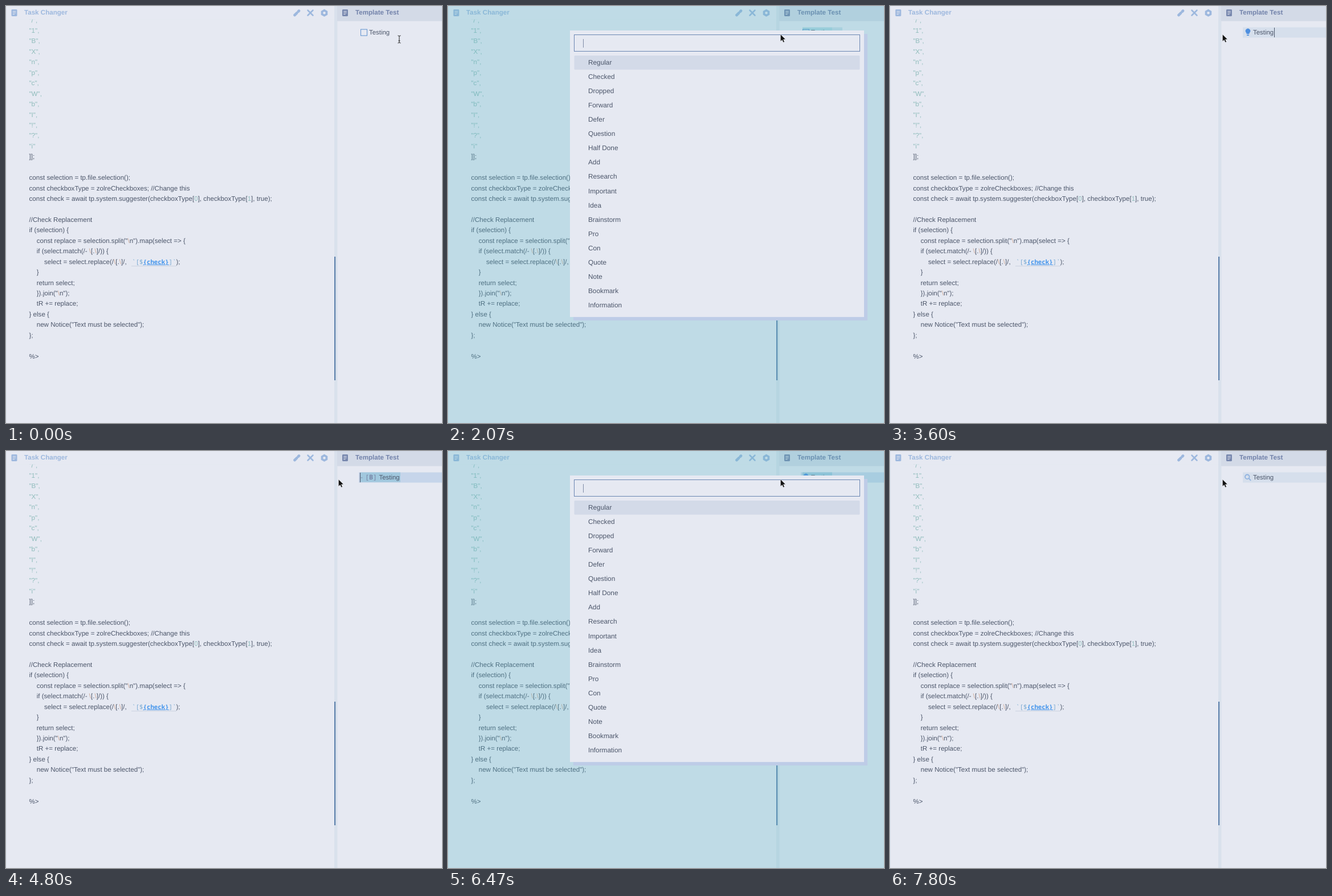
An HTML page for the animation above (8000 ms loop, 765 px wide and 732 px high).

```html
<!DOCTYPE html>
<html lang="en">
<head>
<meta charset="utf-8">
<title>Task Changer</title>
<style>
  html, body { margin: 0; width: 100%; height: 100%; overflow: hidden; background: #e6e9f2; }
  svg { display: block; width: 765px; height: 732px; }
  text { font: 11.6px "Liberation Sans", Arial, sans-serif; fill: #4c566a; white-space: pre; text-rendering: geometricPrecision; }
  .title { font-weight: 700; }
  .str { fill: #8fbcbb; }
  .esc { fill: #cfa793; }
  .mono { font-family: "Noto Sans Mono", "DejaVu Sans Mono", monospace; font-size: 10.8px; fill: #78a9d2; }
  .var { fill: #4596ec; font-weight: 600; text-decoration: underline; }
  .mark { font-family: "Noto Sans Mono", "DejaVu Sans Mono", monospace; fill: #7885a6; }
  .match { font-weight: 700; }
  #typed { font-size: 12px; fill: #7482a6; }
  #dim { fill: rgb(85 181 194 / .27); }
</style>
</head>
<body>
<svg viewBox="0 0 765 732">
  <defs>
    <g id="doc">
      <rect x="0" y="0" width="10" height="12" rx="1.4"/>
      <path d="M2.3 3.4h5.4M2.3 6h5.4M2.3 8.6h3.4" stroke="#e6e9f2" stroke-width="1"/>
    </g>
  </defs>
  <rect width="765" height="732" fill="#e6e9f2"/>
  <g id="code"></g>
  <rect width="576" height="23.5" fill="#e6e9f2"/>
  <rect width="1" height="732" fill="#dce3ee"/>
  <rect x="576" width="5.5" height="732" fill="#d9e1ec"/>
  <rect x="576" y="440" width="2.2" height="217" fill="#5e81ac"/>
  <rect x="581" width="184" height="26.5" fill="#d3dae7"/>

  <g fill="#9db8de">
    <use href="#doc" x="9.5" y="6"/>
    <text class="title" x="32" y="15" style="fill:#9db8de">Task Changer</text>
    <path d="M506.500 16l3.700-3.700M513 9.500l1-1" stroke="#9db8de" stroke-width="4.600" stroke-linecap="round"/>
    <path d="M529.500 7.500l9 9m0-9l-9 9" stroke="#9db8de" stroke-width="2.500" stroke-linecap="round"/>
    <path fill-rule="evenodd" d="M558.500 5.600l5.800 3.300v6.600l-5.800 3.300-5.800-3.300v-6.600zM558.500 9.900a2.300 2.300 0 1 0 .01 0z"/>
  </g>
  <g fill="#7888ae">
    <use href="#doc" x="590" y="6"/>
    <text class="title" x="613" y="15" style="fill:#7282aa">Template Test</text>
  </g>

  <rect id="line" x="619" y="37.500" width="146" height="18"/>
  <rect id="select" y="37.500" height="17"/>
  <g id="note"></g>
  <rect id="noteCaret" y="38" width="1" height="17" fill="#4c566a"/>

  <rect id="dim" width="765" height="732"/>
  <g id="modal">
    <rect id="shadow" x="220" y="49" width="516" fill="#becce7"/>
    <rect id="panel" x="214" y="43" width="516" fill="#e6e9f2"/>
    <rect x="221.500" y="50.500" width="501" height="29" fill="#e6e9f2" stroke="#6a86b2"/>
    <text id="typed" x="237" y="70"></text>
    <rect id="inputCaret" y="58" width="1" height="15" fill="#7f8ba6"/>
    <rect x="221.500" y="87" width="501" height="24.700" rx="1.500" fill="#d3dae8"/>
    <g id="rows"></g>
  </g>

  <path id="beam" d="M-2.500 -6.500q2.500 0 2.500 1.500v10q0 1.500 -2.500 1.500M2.500 -6.500q-2.500 0 -2.500 1.500M0 5q0 1.500 2.500 1.500M-1.500 2.500h3" fill="none" stroke="#222"/>
  <path id="arrow" d="M0 0v12l2.800-2.500 2 4.300 2-.9-1.900-4.200 3.700-.3z" fill="#111" stroke="#fff" stroke-opacity=".6" stroke-width=".6"/>
</svg>
<script>
const LOOP = 8000;
const $ = id => document.getElementById(id);
const span = (cls, s) => `<tspan class="${cls}">${s}</tspan>`;
const str = s => span("str", s);
const esc = span("esc", "\\");
const bracket = `${esc}[.${esc}]`;

// Code listing: [indent level, markup]
const codeLines = [
  ...["/", "1", "B", "X", "n", "p", "c", "W", "b", "I", "!", "?"].map(c => [0, str(`"${c}",`)]),
  [0, str('"i"')],
  [0, "]];"],
  [0, ""],
  [0, "const selection = tp.file.selection();"],
  [0, "const checkboxType = zolreCheckboxes; //Change this"],
  [0, `const check = await tp.system.suggester(checkboxType[${str("0")}], checkboxType[${str("1")}], true);`],
  [0, ""],
  [0, "//Check Replacement"],
  [0, "if (selection) {"],
  [1, `const replace = selection.split("${esc}n").map(select =&gt; {`],
  [1, `if (select.match(/- ${bracket}/)) {`],
  [2, `select = select.replace(/${bracket}/, <tspan class="mono" x="221">\`[$${span("var", "{check}")}]\`</tspan><tspan x="298.5">);</tspan>`],
  [1, "}"],
  [1, "return select;"],
  [1, `}).join("${esc}n");`],
  [1, "tR += replace;"],
  [0, "} else {"],
  [1, 'new Notice("Text must be selected");'],
  [0, "};"],
  [0, ""],
  [0, "%&gt;"]
];
$("code").innerHTML = codeLines.map(([indent, s], i) =>
  `<text x="${40.5 + indent * 13.2}" y="${28.6 + i * 18.44}">${s}</text>`).join("") +
  '<path d="M220 456.500h79" stroke="#cbd3e0"/>';

const choices = ["Regular", "Checked", "Dropped", "Forward", "Defer", "Question", "Half Done", "Add", "Research",
  "Important", "Idea", "Brainstorm", "Pro", "Con", "Quote", "Note", "Bookmark", "Information"];

// Fuzzy match: indices of the query letters in order, or null
function fuzzy(word, query) {
  const hits = [];
  for (const c of query) {
    const i = word.toLowerCase().indexOf(c, hits.length ? hits.at(-1) + 1 : 0);
    if (i < 0) return null;
    hits.push(i);
  }
  return hits;
}

function search(query) {
  const found = choices.map(word => ({ word, hits: fuzzy(word, query) })).filter(r => r.hits);
  if (query) found.sort((a, b) => a.hits.at(-1) - b.hits.at(-1) || a.word.length - b.word.length);
  return found;
}

const testing = (x, y) => `<text x="${x}" y="${y}" style="font-size:11.4px">Testing</text>`;
const raw = mark => `<text x="622" y="50" style="fill:#7885a6">-</text>
  <text class="mark" x="630" y="50">[${span("match", mark)}]</text>` + testing(654.5, 50);
const box = '<rect x="622.5" y="41" width="11" height="11" fill="none" stroke="#5f92cf"/>' + testing(637, 50);
const notes = {
  box,
  picked: '<rect x="674" y="37.5" width="18" height="17" fill="#c6dae8"/>' + box,
  open: raw(" "),
  brain: raw("B"),
  bulb: '<path d="M625.700 49q0-1.500-1-2.500a4.200 4.200 0 1 1 6.600 0q-1 1-1 2.500zM626 50.200h4v1.800h-4z" fill="#4f8fdf"/>' + testing(637, 50.3),
  glass: '<g fill="none" stroke="#8fb2e0" stroke-width="1.8"><circle cx="626.800" cy="45.300" r="3.800"/><path d="M629.700 48.200l3 3.200" stroke-linecap="round"/></g>' + testing(637, 50.3)
};

// Tracks of [start time, value]; each value holds until the next one
const tracks = {
  note: [[0, "box"], [930, "open"], [2070, "picked"], [3600, "bulb"], [4800, "brain"], [5400, "bulb"], [7330, "glass"]],
  query: [[0, null], [2070, ""], [3070, "b"], [3130, "br"], [3200, "bra"], [3270, "brai"], [3330, "brain"],
    [3600, null], [5400, ""], [6930, "r"], [7030, "re"], [7130, "res"], [7330, null]],
  inputCaret: [[0, true], [2600, false], [3070, true], [5930, false], [6470, true]],
  noteCaret: [[0, 0], [1270, 621], [1670, 0], [3600, 674], [4070, 0], [4670, 674], [4800, 621], [5400, 0], [7330, 674], [7800, 0]],
  line: [[0, "none"], [3600, "#d6dfec"], [4800, "#c6d5ea"], [7330, "#d6dfec"]],
  select: [[0, null], [1000, [672, 692]], [1070, [650, 692]], [1130, [625, 692]], [1200, [622, 692]],
    [2070, [622, 674]], [3600, null], [4800, [622, 692]], [5400, [622, 674]], [7330, null]],
  pointer: [[0, [690, 58.5]], [70, [690, 55]], [130, [690, 51]], [200, [690, 48]], [1000, [672, 48]],
    [1070, [650, 49]], [1130, [625, 50]], [1200, [600, 50]], [1270, [583.5, 50]]]
};
const at = (name, t) => tracks[name].findLast(([start]) => start <= t)[1];
const show = (id, on) => $(id).setAttribute("visibility", on ? "visible" : "hidden");
const place = (id, attrs) => { for (const k in attrs) $(id).setAttribute(k, attrs[k]); };

let lastNote, lastQuery;

function drawModal(query) {
  const open = query !== null;
  $("modal").style.display = $("dim").style.display = open ? "" : "none";
  if (!open) return;
  const found = search(query);
  const height = 51.5 + found.length * 25.08;
  place("panel", { height });
  place("shadow", { height });
  $("typed").textContent = query;
  place("inputCaret", { x: query ? Math.round(237 + $("typed").getComputedTextLength()) : 237 });
  $("rows").innerHTML = found.map(({ word, hits }, i) => {
    const label = [...word].map((c, k) => hits.includes(k) ? span("match", c) : c).join("");
    return `<text x="246" y="${102.8 + i * 25.08}" style="font-size:11.8px">${label}</text>`;
  }).join("");
}

function draw() {
  const t = performance.now() % LOOP;
  const note = at("note", t), query = at("query", t);
  if (note !== lastNote) $("note").innerHTML = notes[lastNote = note];
  if (query !== lastQuery) drawModal(lastQuery = query);

  $("inputCaret").style.opacity = at("inputCaret", t) ? 1 : 0;
  const caret = at("noteCaret", t);
  show("noteCaret", caret);
  place("noteCaret", { x: caret });

  const line = at("line", t), range = at("select", t);
  place("line", { fill: line });
  show("select", range);
  if (range) place("select", { x: range[0], width: range[1] - range[0], fill: line === "none" ? "#b1d5e2" : "#a1c8de" });

  const [x, y] = at("pointer", t), transform = `translate(${x} ${y})`;
  place("beam", { transform });
  place("arrow", { transform });
  show("beam", t < 1270);
  show("arrow", t >= 1270);
  requestAnimationFrame(draw);
}
draw();
</script>
</body>
</html>
```
